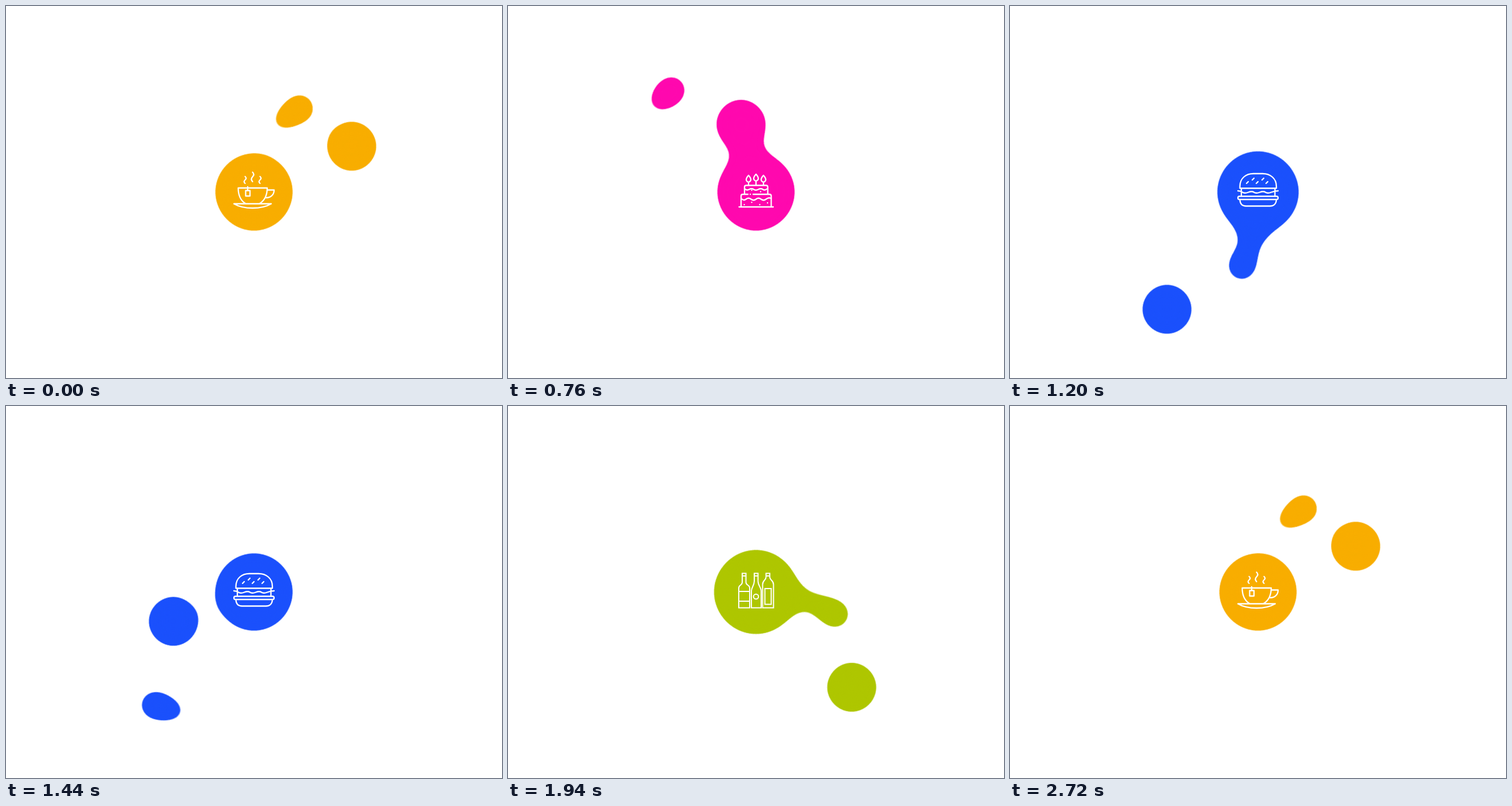
Animation of 864 by 648 pixels, one loop 2740 ms. Source, as an HTML page:

```html
<!DOCTYPE html>
<html lang="en">
<head>
<meta charset="utf-8">
<title>Gooey menu loader</title>
<style>
  html, body { margin: 0; width: 100%; height: 100%; overflow: hidden; background: #fff; }
  svg { display: block; width: 100%; height: 100%; }
  .icon { fill: none; stroke: #fff; stroke-width: 2.3; stroke-linecap: round; stroke-linejoin: round; }
  .sharp { stroke-width: 2; stroke-linejoin: miter; stroke-linecap: butt; }
</style>
</head>
<body>
<svg viewBox="0 0 864 648">
  <defs>
    <filter id="goo" filterUnits="userSpaceOnUse" x="0" y="0" width="864" height="648" color-interpolation-filters="sRGB">
      <feGaussianBlur stdDeviation="20"/>
      <feColorMatrix values="1 0 0 0 0  0 1 0 0 0  0 0 1 0 0  0 0 0 30 -14.5"/>
    </filter>
  </defs>
  <g id="blobs" filter="url(#goo)"></g>

  <g class="icon">
    <path d="M397 344.5H462C445 354.5 414 354.5 397 344.5Z"/>
    <path d="M417 344C409 339 404.5 330 404.5 317H455C455 330 450 339 442 344"/>
    <path d="M455 320.5H467C467 329 461 334 453 334M421 315V321M417.5 321.5h7.5v9.5h-7.5z"/>
    <path d="M416.5 297q3.5 3 0 6t0 6M429.5 289.5q4 4 0 8t0 8.5M442.5 297q3.5 3 0 6t0 6"/>
  </g>

  <g class="icon">
    <path d="M402.5 350H462M406 350V331q0-3 3-3H418M427 328H455.5q3 0 3 3V350M412 328V315.5q0-3 3-3H449.500q3 0 3 3V328"/>
    <path d="M406 335q4.500 5 8.700 1.500t8.700 0t8.700 0t8.700 0t8.700 0t8.700-1.500M412 318q3.500 4 8 1.500t8 0t8 0t8 0t8-1.500"/>
    <path d="M419 312V307M432 312V305M445 312V307"/>
    <path d="M419 295q-8 9 0 12q8-3 0-12zM432 293q-8 9 0 12q8-3 0-12zM445 295q-8 9 0 12q8-3 0-12z"/>
    <path d="M422 328h.1M424.500 321h.1M440 323.500h.1M411.500 346h.1M424.500 342h.1M438.500 346h.1M452 343h.1"/>
  </g>

  <g class="icon" stroke-width="2.600">
    <path d="M400.500 317.500V314C400.500 300 411 292 424 292H440C453 292 464 300 464 314V317.500Z"/>
    <path d="M412 309l3-3M422 303l3-3M429 309l3-3M439 303l3-3M446 309l3-3"/>
    <path d="M403 318V331M461.500 318V331M397 322q4.500 0 8 2.500t10 0t10 0t10 0t10 0t10 0t12-2.500"/>
    <rect x="397" y="331.500" width="70" height="5.500" rx="2.750"/>
    <path d="M400.500 338C401 345 405 348.500 411 348.500H453C459 348.500 463.500 345 464 338"/>
  </g>

  <g class="icon sharp">
    <path d="M402 351.500V317C402 311 408 313 408 307V291.500H414.500V307C414.500 313 421 311 421 317V351.500ZM408 296h6.500M402 323h19M402 340h19"/>
    <path d="M424 351.500V322C424 316 429 313 429 305V291.500H435.500V305C435.500 313 441 316 441 322V351.500ZM429 296h6.500"/>
    <circle cx="432" cy="332" r="4.300"/>
    <path d="M443.500 351.500V311C443.500 303 449.500 304 449.500 298V291.500H456V298C456 304 462.500 303 462.500 311V351.500ZM449.500 296H456M447.500 318h11v27.500h-11z"/>
  </g>
</svg>
<script>
const CENTER = { x: 432, y: 324 };
const FRAME = 20, LOOP = 2740, STEP = 680, CYCLE = 4 * STEP;

// Each flavour flies the same unit loop, turned and stretched differently.
const flavours = [
  { color: '#f8ad00', turn: -90, reach: [159, 175], lead: 0 },
  { color: '#ff08ae', turn: 180, reach: [181, 182], lead: 35 },
  { color: '#1a50fc', turn: 90, reach: [211, 197], lead: 0 },
  { color: '#aec600', turn: 0, reach: [191, 175], lead: 0 }
];
const loopX = [0, .25, .487, .736, .92, .985, .89, .67, .48, .32, .144, .08, .03, 0].map((v, i) => [i, v]);
const loopY = [0, .03, .08, .23, .46, .72, .935, 1, .96, .76, .648, .42, .18, 0].map((v, i) => [i, v]);

// Time in ms against progress along the loop.
const ballTiming = [[-560, 0], [-480, .8], [-400, 2], [-280, 3.75], [-160, 5.35], [-100, 6.1],
  [0, 7.88], [115, 10], [280, 12], [360, 13]];
const dropTiming = [[-340, 0], [-245, 1.4], [-160, 2.5], [-100, 2.95], [0, 4],
  [115, 6.4], [280, 8.8], [400, 10.85], [520, 13]];

const parts = [
  { radius: 47, timing: ballTiming, behind: 0 },
  { radius: 30, timing: dropTiming, behind: 0 },
  { radius: 21, timing: dropTiming, behind: .85 }
];

const blobs = document.getElementById('blobs');
const icons = document.querySelectorAll('.icon');

function addCircle(radius, color) {
  const circle = document.createElementNS('http://www.w3.org/2000/svg', 'circle');
  circle.setAttribute('r', radius);
  circle.setAttribute('fill', color);
  return blobs.appendChild(circle);
}

function place(circle, x, y) {
  circle.setAttribute('cx', CENTER.x + x);
  circle.setAttribute('cy', CENTER.y + y);
}

// Smooth curve through [position, value] keys, clamped at both ends.
function curve(keys, at) {
  const last = keys.length - 1;
  if (at <= keys[0][0]) return keys[0][1];
  if (at >= keys[last][0]) return keys[last][1];
  const i = keys.findIndex(key => key[0] > at) - 1;
  const slope = n => {
    const a = keys[Math.max(n - 1, 0)], b = keys[Math.min(n + 1, last)];
    return (b[1] - a[1]) / (b[0] - a[0]);
  };
  const [x0, y0] = keys[i], [x1, y1] = keys[i + 1];
  const w = x1 - x0, u = (at - x0) / w, v = 1 - u;
  return v * v * ((1 + 2 * u) * y0 + u * w * slope(i)) +
         u * u * ((1 + 2 * v) * y1 - v * w * slope(i + 1));
}

const bump = (t, peak, height) => height * Math.exp(-(((t - peak) / 60) ** 2));
const flavourAt = t => Math.floor(t / STEP) % 4;

for (const flavour of flavours) {
  flavour.circles = parts.map(part => addCircle(part.radius, flavour.color));
}
const body = addCircle(70, flavours[0].color);
place(body, 0, 0);

function draw(t) {
  flavours.forEach(({ turn, reach, lead, circles }, index) => {
    const local = (t - index * STEP + 600 + CYCLE) % CYCLE - 600 + lead;
    const angle = turn * Math.PI / 180, cos = Math.cos(angle), sin = Math.sin(angle);
    parts.forEach(({ timing, behind }, n) => {
      const progress = curve(timing, local) - behind;
      const x = curve(loopX, progress) * reach[0];
      const y = curve(loopY, progress) * reach[1];
      place(circles[n], x * cos - y * sin, x * sin + y * cos);
    });
  });

  // The body swells as the ball, then its drop, is absorbed.
  const phase = t % STEP;
  body.setAttribute('r', 70 + bump(phase, 385, 11.5) + bump(phase, 565, 6));
  body.setAttribute('fill', flavours[flavourAt(t + 530)].color);
  const shown = flavourAt(t + 340);
  icons.forEach((icon, i) => { icon.style.display = i === shown ? '' : 'none'; });
}

const start = performance.now();
function tick() {
  const elapsed = (performance.now() - start) % LOOP;
  draw(Math.floor(elapsed / FRAME) * FRAME % CYCLE);
  requestAnimationFrame(tick);
}
tick();
</script>
</body>
</html>
```
